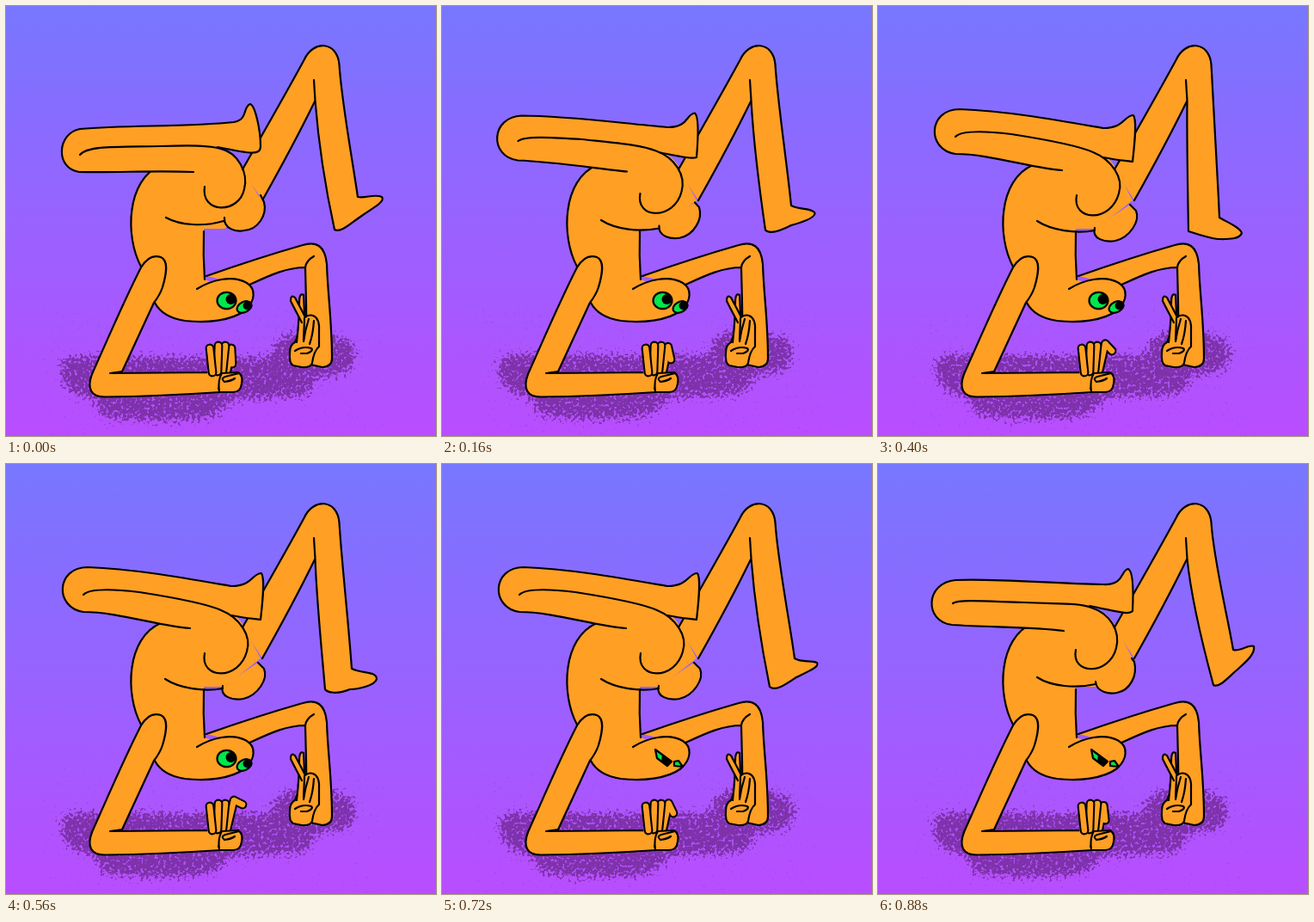
An HTML page for the animation above (960 ms loop, 500x500 px).

```html
<!DOCTYPE html>
<html lang="en">
<head>
<meta charset="utf-8">
<title>Forearm stand</title>
<style>
  html, body { margin: 0; width: 100%; height: 100%; overflow: hidden; }
  svg { display: block; width: 100vw; height: 100vh; }
  .ink { fill: none; stroke: #000; stroke-width: 2.2; stroke-linecap: round; stroke-linejoin: round; }
  .skin { fill: #ff9f24; }
  .eye { fill: #00e64d; }
  .outer, .inner { fill: none; stroke: #000; stroke-width: 10.8; stroke-linecap: round; stroke-linejoin: round; }
  .inner { stroke: #ff9f24; stroke-width: 6.6; }
</style>
</head>
<body>
<svg viewBox="0 0 500 500">
  <defs>
    <linearGradient id="sky" x2="0" y2="1">
      <stop stop-color="#7777ff"/>
      <stop offset="1" stop-color="#b94dff"/>
    </linearGradient>
    <filter id="chalk" filterUnits="userSpaceOnUse" x="40" y="350" width="400" height="150" color-interpolation-filters="sRGB">
      <feGaussianBlur in="SourceAlpha" stdDeviation="5.5" result="soft"/>
      <feTurbulence id="grain" type="fractalNoise" baseFrequency=".3" numOctaves="2"/>
      <feColorMatrix values="0 0 0 0 0  0 0 0 0 0  0 0 0 0 0  0 0 0 2 -.5"/>
      <feComposite in2="soft" operator="arithmetic" k2="1.3" k3="1.1" k4="-1.25" result="mix"/>
      <feComponentTransfer in="mix" result="mask"><feFuncA type="linear" slope="3.5"/></feComponentTransfer>
      <feFlood flood-color="#7e32aa"/>
      <feComposite in2="mask" operator="in"/>
    </filter>
  </defs>
  <rect width="500" height="500" fill="url(#sky)"/>
  <g filter="url(#chalk)">
    <path id="shadow" d="M64 418Q62 403 90 404L230 405L310 405Q308 384 335 377Q380 373 407 391Q414 424 386 428L360 432Q366 450 335 454L262 457Q254 478 215 481Q150 484 110 476L104 457Q60 450 64 418Z"/>
  </g>

  <path class="skin" d="M180 185C140 202 140 268 157 303L173 345L222 362L250 325L231 318L230 259L254 259L296 226L277 190C270 176 262 170 240 165Z"/>
  <path id="farLeg" class="ink skin"/>

  <g class="ink">
    <path class="skin" d="M233 314C270 301 310 288 345 278C361 273 371 279 373 300C374 335 379 365 379 410Q379 419 368 420L350 416L349 345L348 304C325 304 305 314 281 325"/>
    <path d="M348 304Q349 296 358 291"/>
  </g>
  <g id="farHand">
    <path class="ink skin" d="M345 364Q352 358 357 360Q365 363 364 378L364 396Q358 401 356 415Q354 421 344 420L334 418Q329 416 330 403Q330 394 336 391L343 374Z"/>
    <path class="ink skin" d="M338 391Q341 365 341 345Q341 333 346 336Q347 352 347 366L346 388"/>
    <path class="ink skin" d="M344 368Q336 353 331 343Q331 335 336 339Q342 350 347 360"/>
    <path class="ink" d="M346 390Q348 376 352 364M353 393Q357 382 358 366M336 401Q345 395 355 398Q358 401 350 404L343 404"/>
  </g>

  <path id="bump" class="ink skin"/>
  <path class="ink" d="M180 185C140 202 138 268 157 303M230 262Q229 290 231 318"/>
  <path id="belly" class="ink"/>
  <path id="nearLeg" class="ink skin"/>
  <path id="crease" class="ink"/>

  <path class="ink skin" d="M222 329C238 319 263 312 280 322C291 329 290 343 278 354C262 366 233 369 208 366Q182 362 173 345"/>
  <g id="openEyes">
    <ellipse class="ink eye" cx="256.5" cy="342.5" rx="11" ry="9.7"/>
    <circle cx="261.5" cy="341" r="6"/>
    <ellipse class="ink eye" cx="277" cy="350" rx="9" ry="6" transform="rotate(-28 277 350)"/>
    <ellipse cx="281" cy="348.5" rx="5.5" ry="5"/>
  </g>
  <g id="halfEyes">
    <path class="ink eye" d="M248 332L267 346L262 351L250 342Z"/>
    <path d="M256 338L267 346L262 351L255 346Z"/>
    <path class="ink eye" d="M270 346L275 345L280 352L270 351Z"/>
  </g>
  <path id="shutEyes" class="ink" d="M248 336L266 349M270 349L279 354"/>

  <path class="ink skin" d="M182 327C187 310 189 296 180 292C171 289 163 294 157 304C137 343 118 388 100 428C94 444 98 455 116 454.5C160 454 205 452 249 449L240 426L121 427L135 425L172 345C179 336 182 327 182 327"/>

  <path class="skin" d="M234 422L262 422L262 440L236 446Z"/>
  <g id="fingers"></g>
  <path class="ink skin" d="M248 449Q246 435 251 427L270 426Q276 430 274 439Q273 449 264 449Z"/>
  <path class="ink" d="M254 437Q249 433 255 431L271 427M254 437Q262 436 266 433"/>
</svg>
<script>
const $ = id => document.getElementById(id);
const draw = (id, d) => $(id).setAttribute('d', d);
const show = (id, on) => $(id).style.display = on ? '' : 'none';

// Blend between successive path poses of equal structure.
function blend(poses, t) {
  const i = Math.min(Math.floor(t), poses.length - 2);
  const next = poses[i + 1].match(/[\d.]+/g);
  return poses[i].replace(/[\d.]+/g, n => +n + (next.shift() - n) * (t - i));
}

// Far shin and foot, from raised to lowered.
const shins = [
  '406 175 413 216C420 219 432 209 437 212C439 222 425 232 418 239C408 247 397 261 390 257C376 205 364 155',
  '403 180 409 222C418 224 428 218 437 222C442 227 425 236 415 243C400 253 390 264 382 260C370 205 363 155',
  '404 182 410 226C418 231 428 228 436 231C440 236 422 243 412 248C400 256 388 265 381 259C370 205 363 155',
  '398 182 402 238C415 244 431 241 431 250C429 258 408 262 400 262C385 268 374 266 371 262C366 205 361 155',
  '394 180 397 246C405 251 421 257 423 264C420 272 405 271 395 271C380 269 365 263 361 262C360 205 359 155'
];
const nearLegs = [
  'M218 193C170 191 130 194 85 193C57 189 59 148 86 143C140 138 210 141 265 135C282 132 275 117 284 114C290 116 296 145 296 163C296 174 285 172 246 164',
  'M216 194C180 189 130 190 86 187C53 183 55 138 90 135C140 133 200 139 262 140C287 141 282 123 291 122C297 125 297 150 296 171C291 176 277 171 246 165',
  'M214 191C180 189 130 172 90 172C56 167 58 120 95 120C150 122 210 133 262 142C287 142 286 127 297 127C301 133 299 155 296 181C289 180 277 179 262 176'
];
const creases = [
  'M86 173C95 162 130 164 180 163C215 162 236 162 250 166C270 171 282 194 277 213C271 242 226 242 231 210',
  'M87 162C95 157 130 160 170 161C210 163 232 161 248 167C270 174 282 194 277 214C269 246 224 246 230 216',
  'M90 152C98 144 130 146 155 149C200 156 232 162 250 170C272 179 286 200 280 218C271 252 225 251 231 220'
];
const bumps = [
  'M254 246C253 259 267 263 277 261C293 260 304 243 300 228L296 220',
  'M253 253C254 265 268 268 278 266C293 263 302 246 298 230L295 226',
  'M252 258C248 271 264 275 276 273C293 269 305 250 300 238L293 231'
];
const bellies = [
  'M186 246C202 255 230 257 253 250',
  'M185 248C202 259 230 261 253 256',
  'M185 250C202 261 230 265 252 261'
];

const tube = d => `<path class="outer" d="${d}"/><path class="inner" d="${d}"/>`;

const shinPhase = [1, 2, 2.5, 3, 3.5, 4, 3.5, 3, 2.5, 2, 1, 0];
const legPhase = [0, 1, 1.5, 2, 2, 2, 2, 2, 2, 2, 1.5, 1];
const pinkyPhase = [0, 0, .25, .5, .65, .75, .9, 1, .75, .5, .25, .1];
let last = -1;

function pose(n) {
  const leg = legPhase[n], curl = pinkyPhase[n], boil = n % 4;
  $('grain').setAttribute('seed', boil * 7 + 1);
  $('shadow').setAttribute('transform', `translate(${[-1, 2, 0, -1][boil]} ${boil ? 0 : 2})`);
  draw('farLeg', 'M275 190C300 146 327 99 347 62C357 40 385 40 387.5 68C390 110 ' +
    blend(shins, shinPhase[n]) + ' 359.5 110L358 86L359.5 110C340 150 320 187 298 226');
  draw('nearLeg', blend(nearLegs, leg));
  draw('crease', blend(creases, leg));
  draw('bump', blend(bumps, leg));
  draw('belly', blend(bellies, leg));
  $('fingers').innerHTML =
    tube(`M257 424L${262 + curl * 3} ${398 - curl * 7}L${263 + curl * 12} ${416 - curl * 20}`) +
    tube('M252 424L255 395') + tube('M246 425L247 395') + tube('M240 426L237 398');
  show('openEyes', n < 9);
  show('halfEyes', n === 9 || n === 11);
  show('shutEyes', n === 10);
}

function tick(now) {
  const n = Math.floor(now / 80) % 12;
  if (n !== last) pose(last = n);
  requestAnimationFrame(tick);
}
pose(0);
requestAnimationFrame(tick);
</script>
</body>
</html>
```
